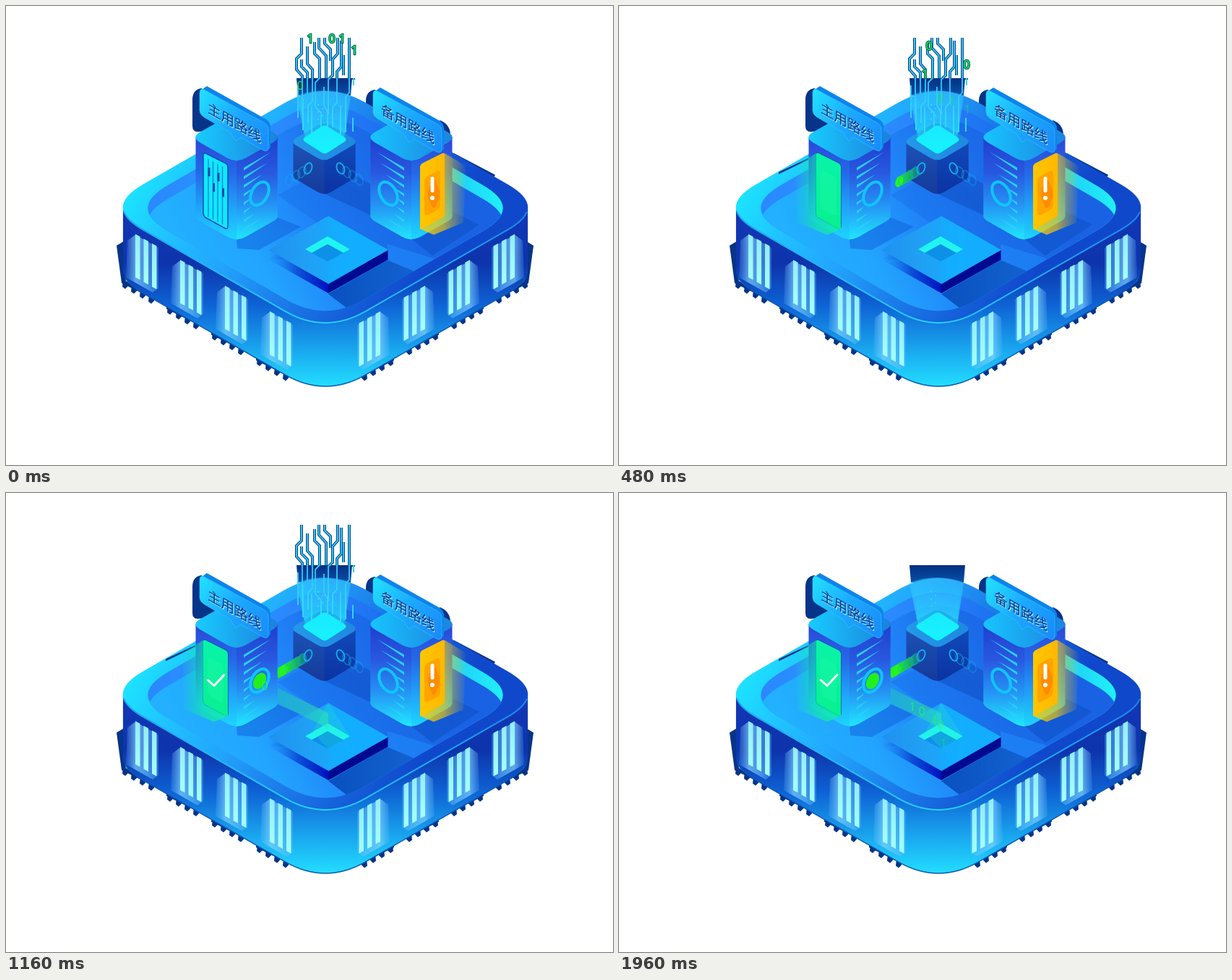
Animation, 840 px wide and 636 px high, one loop 2 s. Source, as an HTML page with a canvas:

```html
<!DOCTYPE html>
<html lang="zh">
<head>
<meta charset="utf-8">
<style>
html, body { margin: 0; width: 100%; height: 100%; overflow: hidden; background: #fff; }
canvas { display: block; }
</style>
</head>
<body>
<canvas id="stage" width="840" height="636"></canvas>
<script>
const c = document.getElementById('stage').getContext('2d');
const LOOP = 2000, STEP = 40;
const NAVY = '#063488';

const ramp = (t, a, b) => Math.min(1, Math.max(0, (t - a) / (b - a)));

function grad(x0, y0, x1, y1, ...colors) {
  const g = c.createLinearGradient(x0, y0, x1, y1);
  colors.forEach((k, i) => g.addColorStop(i / (colors.length - 1), k));
  return g;
}
function fill(d, paint) {
  c.fillStyle = paint;
  c.fill(typeof d === 'string' ? new Path2D(d) : d);
}
function line(d, paint, width) {
  c.strokeStyle = paint;
  c.lineWidth = width;
  c.stroke(typeof d === 'string' ? new Path2D(d) : d);
}
function oval(x, y, rx, ry, turn = 0) {
  const p = new Path2D();
  p.ellipse(x, y, rx, ry, turn, 0, 7);
  return p;
}
function local(draw, ...matrix) {
  c.save();
  if (matrix.length) c.transform(...matrix);
  draw();
  c.restore();
}
function clipped(x, y, w, h, draw) {
  local(() => {
    c.beginPath();
    c.rect(x, y, w, h);
    c.clip();
    draw();
  });
}
const faded = (alpha, draw) => local(() => { c.globalAlpha *= alpha; draw(); });
const mirrored = (axis, draw) => local(draw, -1, 0, 0, 1, 2 * axis, 0);
const besideMain = draw => local(draw, 1, 0, 0, 1, 240, 2);

// Rhombus with sharp radii rx, ry and corners rounded by the share f
function rhombus(x, y, rx, ry, f) {
  const p = new Path2D(), tips = [[0, -ry], [rx, 0], [0, ry], [-rx, 0]];
  const mix = (a, b) => [x + a[0] + (b[0] - a[0]) * f, y + a[1] + (b[1] - a[1]) * f];
  tips.forEach((tip, i) => {
    p.lineTo(...mix(tip, tips[(i + 3) % 4]));
    p.quadraticCurveTo(x + tip[0], y + tip[1], ...mix(tip, tips[(i + 1) % 4]));
  });
  p.closePath();
  return p;
}
function prism(x, y, rx, ry, f, h, left, right, top) {
  const w = rx * (1 - f / 2), base = rhombus(x, y + h, rx, ry, f);
  const half = (x0, w0, paint) => clipped(x0, y, w0, h + ry, () => {
    fill(base, paint);
    c.fillRect(x0, y, w0, h);
  });
  half(x - w, 2 * w, left);
  if (right !== left) half(x, w, right);
  fill(rhombus(x, y, rx, ry, f), top);
}

// Runs a drawing at each of the four bays of the left wall
function bays(draw) {
  for (let i = 0; i < 4; i++) local(draw, 1, 0, 0, 1, i * 62, i * 35.7);
}
function feet() {
  fill('M163 326L153 332L160 384H166Z', NAVY);
  bays(() => {
    fill('M160 378L206 404V407L160 384Z', NAVY);
    for (let k = 0; k < 4; k++) fill(`M${162 + k * 12} ${379 + k * 6.8}l7 4v5l-4 4l-4 -3z`, NAVY);
  });
}
function windows() {
  bays(() => {
    fill('M168 325L179 317L211 335V391L203 397L166 376Z',
      grad(164, 0, 211, 0, '#70c0ff10', '#84d4ffb0', '#70c8ff90', '#60b8ff50'));
    for (let k = 0; k < 3; k++) {
      const x = 179 + k * 11.5, y = 316 + k * 6.5;
      fill(`M${x} ${y}l6.5 3.5v60l-6.5 -3.5z`, grad(0, y, 0, y + 60, '#90ecff', '#a4fffa'));
    }
  });
}

function platform() {
  feet();
  mirrored(441.5, feet);
  fill('M620 204L677 234L674 239L620 212Z', NAVY);
  fill('M402 100H479L477 124H404Z', grad(0, 100, 0, 124, '#042f82', '#0750a8'));
  const side = grad(0, 300, 0, 527, '#1236b4', '#0d34ac', '#0e62d4', '#18a0ec', '#22deff');
  const top = grad(200, 200, 560, 400, '#1ce4ff', '#20c0ff', '#22a4fc', '#1c80ec', '#1664dc', '#1048cc');
  prism(442, 279, 308, 177, 0.18, 87, side, side, top);
  clipped(150, 376, 584, 160, () => line(rhombus(442, 366, 308, 177, 0.18), '#0c58b4', 1.4));
  clipped(160, 285, 564, 170, () =>
    line(rhombus(442, 278, 308, 177, 0.18), grad(162, 0, 722, 0, '#20a0f0', '#28d0ff', '#1a88e8'), 2));
  windows();
  mirrored(441.5, windows);

  const inner = rhombus(442, 280, 273, 158, 0.2);
  fill(inner, grad(196, 0, 688, 0,
    '#2a88ff', '#2a90ff', '#2a8cff', '#2a80f8', '#1a70f0', '#20c8f8', '#20f0f8'));
  local(() => {
    c.clip(inner);
    fill(rhombus(442, 299, 273, 158, 0.2),
      grad(260, 360, 560, 200, '#22b0ff', '#22a4ff', '#2084f8', '#1c70ec', '#1a62e4'));
    fill('M376 262L440 228L640 345L560 390Z', '#1768e460');
    fill('M319 323L376 293L408 306L350 338L320 336Z', '#0d58d470');
    fill('M561 323L618 285L655 303L590 346Z', '#0d4cc480');
    fill('M440 260L484 235L505 247V290Z', '#0c46b870');
    fill('M446 399L528 352L578 373L480 425Z', grad(446, 0, 578, 0, '#0a50c0', '#1264d0'));
    fill('M528 330L592 350L578 373L528 352Z', '#2090ff80');
  });
}

function ports() {
  for (let i = 3; i >= 0; i--) faded(i ? 0.5 - i * 0.05 : 1, () =>
    line(oval(418 - i * 8.5, 225 + i * 5.3, 5, 8, 0.4), '#14b0e8', 1.8));
}

function pipe(t) {
  const p = ramp(t, 80, 680);
  if (!p) return;
  const x = 415 - 41 * p, y = 228 + 23 * p;
  line(`M415 228L${x} ${y}`, grad(415, 0, 384, 0, '#128c7cb0', '#18c048', '#20f028'), 13);
  if (p > 0.2) fill(oval(Math.max(384, x), Math.min(246, y), 5, 8, 0.4), '#24f420');
}

function core(t) {
  fill('M402 124Q440 110 477 124L468 185H414Z', grad(0, 116, 0, 185, '#38c8ff70', '#30dcffb0'));
  prism(440.5, 188, 48, 28, 0.2, 47,
    grad(0, 195, 0, 255, '#1c50b4', '#153c9c'), grad(0, 195, 0, 255, '#1048b8', '#0c34a4'),
    grad(397, 0, 484, 0, '#2498e8', '#2088e0'));
  fill(rhombus(441, 185, 32, 21, 0.15), '#10f4ff');
  fill('M408 126H473L468 186L441 200L414 186Z', grad(0, 126, 0, 200, '#20c8ff10', '#20f0ffa0'));
  for (let i = 0; i < 5; i++) fill(oval(432 + i % 2 * 6, 137 + i * 5, 1, 1), '#30e0ff');
  pipe(t);
  ports();
  mirrored(440.5, ports);
}

const circuit = new Path2D(`M409 44V66L402 73V88L410 97V150 M417 56V80L424 88V132L418 138V162
  M409 74V84L417 92V122 M427 50V66L434 73V100L428 106V140L436 148V170 M433 44V58L443 69V100
  M441 44V52L449 60V76 M459 44V66L452 74V96L446 102V150 M464 48V84L458 91V134L452 140V168
  M467 68V96 M475 44V120L470 126V175 M404 110V155 M411 128V172 M440 112V138L445 146V172
  M423 140V176 M463 138V178 M480 155V174 M481 100V110`);

function circuits(t) {
  if (t >= 1520) return;
  clipped(395, 40, 95, 62, () => line(circuit, '#084c90', 4));
  line(circuit, grad(0, 44, 0, 180, '#48c8f0', '#30c8f8', '#30e4ff'), 1.8);
}

const panel = 'M276 204L304 218Q307 220 307 224V305Q307 310 303 308L276 293Q273 291 273 287V207Q273 203 276 204Z';

function building(top) {
  prism(319, 182, 63, 36, 0.2, 109,
    grad(0, 185, 0, 322, '#2c48d8', '#2468e8', '#20a0f8', '#1cd4ff'),
    grad(0, 185, 0, 322, '#2040d0', '#2858e0', '#2494f4', '#20e4ff'), top);
  for (let i = 0; i < 8; i++) {
    const y = 224 + i * 12, len = [38, 33, 26, 15, 11, 11, 15, 24][i];
    fill(`M329 ${y}L${329 + len} ${y - len * 0.57}L329 ${y + 4}Z`, '#28d0fc');
  }
  line(oval(351, 260, 11, 17.5, 0.5), '#10c4ff', 4);
}
function grille() {
  fill(panel, '#10e8ff');
  line(panel, '#0a50b8', 1.5);
  for (let i = 0; i < 4; i++) {
    const x = 280 + i * 6.5, y = 212 + i * 3.5;
    line(`M${x} ${y}V${y + 80}`, '#0c8cdc', 1.5);
    line(`M${x + 1} ${y + 12 + i % 2 * 18}v12`, '#0c48b0', 3);
  }
}
function glowPanel(rgb, main, inner) {
  fill('M273 204L307 222V309L288 317L247 300L243 222Z', grad(307, 0, 242, 0, rgb + 'd0', rgb + 'a0', rgb + '00'));
  fill(panel, main);
  fill('M284 229L297 236Q301 239 301 243V285Q301 292 295 289L284 283Q279 280 279 275V233Q279 227 284 229Z', inner);
}

function signShade() {
  fill('M270 114Q258 116 258 130V166Q258 176 268 174L300 172V128Z', NAVY);
}
function sign(text) {
  fill('M268 118L278 111L360 157Q366 161 366 168V196L361 201Z', '#0c84ec');
  const face = `M274 116L356 161Q363 165 363 171V195Q363 203 356 200L325 182L318 187L310 175L274 154
    Q268 150 268 145V121Q268 113 274 116Z`;
  fill(face, grad(268, 120, 362, 195, '#22e0ff', '#1ca8ff', '#1a8cf8'));
  line(face, '#30c8ffa0', 1);
  local(() => {
    c.font = '500 18.5px "Noto Sans CJK SC", "Noto Sans CJK", sans-serif';
    c.textAlign = 'left';
    c.textBaseline = 'middle';
    c.fillStyle = '#a8ecff';
    c.fillText(text, 1, 1);
    c.fillStyle = '#0c3688';
    c.fillText(text, 0, 0);
  }, 1, 0.57, 0, 1, 279, 140);
}

function mainTower(t) {
  const on = ramp(t, 0, 240), check = ramp(t, 560, 780);
  faded(on, () => fill('M262 211L221 230V233L262 213Z', NAVY));
  building(grad(262, 0, 376, 0, '#18ccff', '#1c80dc'));
  grille();
  faded(on, () => glowPanel('#10f0a0', grad(0, 204, 0, 309, '#08f4a8', '#08f090'), '#20f8a850'));
  if (check) local(() => {
    c.lineCap = c.lineJoin = 'round';
    c.setLineDash([36 * check, 99]);
    line('M279 259L288 267L302 252', '#fff', 3);
  });
  faded(ramp(t, 720, 880), () => fill(oval(351, 260.5, 8, 12, 0.5), '#22f01c'));
  sign('主用路线');
}

function spareTower() {
  mirrored(440, () => {
    building(grad(262, 0, 376, 0, '#1c84e0', '#18c4ff'));
    glowPanel('#ffd000', grad(273, 0, 307, 0, '#ffb800', '#ffc600'), '#ffa400');
  });
  fill(rhombus(592, 260, 10, 24, 0.35), '#ff8c00');
  local(() => {
    c.lineCap = 'round';
    line('M590 239V256', '#fff', 5);
  });
  fill(oval(590, 266, 3, 3), '#fff');
  besideMain(() => sign('备用路线'));
}

function pad(t) {
  prism(446, 338, 83, 47, 0.01, 13,
    grad(362, 0, 446, 0, '#1880f000', '#0c50d8', '#0010c0'), '#000a90',
    grad(362, 0, 528, 0, '#2090f0', '#20a0f4', '#14acff', '#18a8ff'));
  fill('M446 291L528 338L446 386Z', '#10b0ff70');
  fill('M445 319L476 337L445 354L414 337Z', '#0c90e8');
  fill('M414 337L445 319L476 337L467 342L445 330L423 342Z', '#20f4f0');
  // The green link reaches from the tower to the hole
  clipped(370, 260, 110 * ramp(t, 1000, 1120), 100, () => {
    fill('M376 270L446 305V326L376 292Z', grad(376, 0, 446, 0, '#20d0b070', '#28e8b090'));
    fill('M446 291L476 337L445 354L424 331Z', '#28f0c038');
  });
}

// Each digit: character, then time, x, y of its path points
const rain = [
  ['1', 0, 421, 45, 280, 425, 75, 680, 422, 112, 960, 423, 131, 1120, 423, 140],
  ['0', 0, 451, 45, 280, 442, 99, 680, 446, 154, 800, 446, 168],
  ['1', 0, 465, 45, 280, 458, 110, 680, 462, 154, 800, 462, 168],
  ['1', 0, 482, 61, 280, 482, 109, 600, 482, 164],
  ['0', 0, 407, 110, 280, 415, 158, 360, 415, 170],
  ['1', 120, 437, 138, 280, 437, 158, 360, 437, 170],
  ['0', 400, 430, 46, 680, 427, 78, 960, 423, 107, 1120, 423, 124],
  ['0', 300, 481, 45, 680, 481, 120, 920, 481, 168]
];
const flow = [
  ['0', 1130, 351, 263, 1360, 406, 296, 1680, 447, 327, 1800, 449, 346],
  ['1', 1200, 351, 263, 1360, 376, 280, 1680, 431, 310, 1960, 449, 346],
  ['0', 1380, 351, 263, 1680, 406, 296, 1960, 445, 321],
  ['1', 1440, 351, 263, 1680, 393, 290, 1960, 437, 315],
  ['0', 1580, 351, 263, 1680, 368, 274, 1960, 419, 302],
  ['1', 1680, 351, 263, 1960, 406, 296]
];
function place(k, t) {
  for (let i = 0; i + 3 < k.length; i += 3) {
    if (t < k[i] || t > k[i + 3]) continue;
    const p = ramp(t, k[i], k[i + 3]);
    return [k[i + 1] + (k[i + 4] - k[i + 1]) * p, k[i + 2] + (k[i + 5] - k[i + 2]) * p];
  }
}
function digits(list, t, color, alphaAt) {
  c.font = '16px "Noto Sans", sans-serif';
  c.textAlign = 'center';
  c.textBaseline = 'alphabetic';
  for (const [char, ...keys] of list) {
    const at = place(keys, t);
    if (!at) continue;
    const [x, y] = at;
    faded(alphaAt(y), () => {
      if (y < 100) {
        c.strokeStyle = '#08706c';
        c.lineWidth = 2.5;
        c.strokeText(char, x, y + 6);
      }
      c.fillStyle = color;
      c.fillText(char, x, y + 6);
    });
  }
}

function draw(now) {
  const t = Math.floor(now % LOOP / STEP) * STEP;
  c.fillStyle = '#fff';
  c.fillRect(0, 0, 840, 636);
  signShade();
  besideMain(signShade);
  fill('M600 158Q615 164 615 179L605 181Z', NAVY);
  platform();
  core(t);
  circuits(t);
  digits(rain, t, '#20ec50', y => ramp(y, 172, 110));
  pad(t);
  mainTower(t);
  spareTower();
  digits(flow, t, '#28f060', y => 0.9 - 0.5 * ramp(y, 300, 346));
  requestAnimationFrame(draw);
}
draw(0);
</script>
</body>
</html>
```
